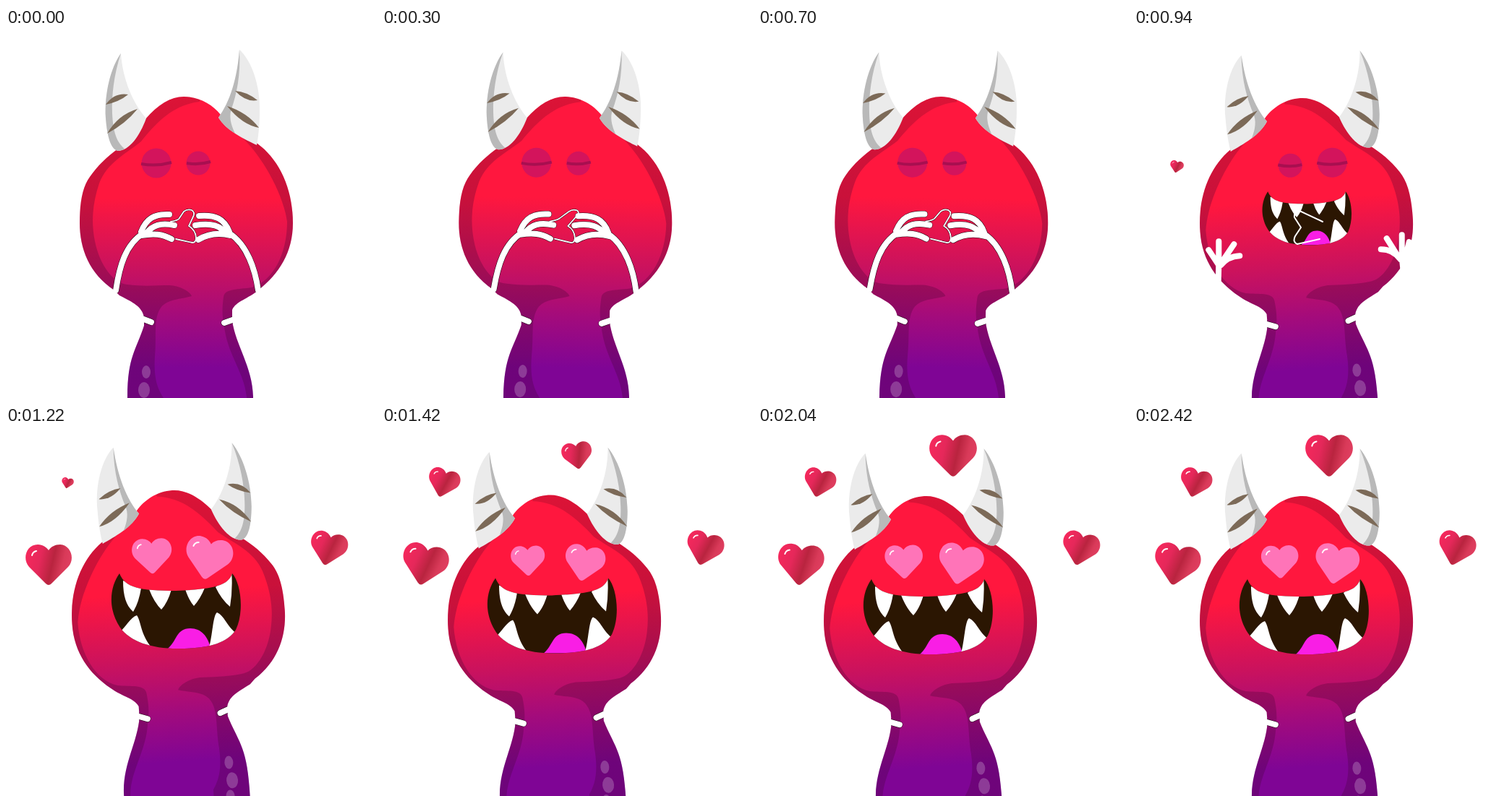
An HTML page for the animation above (2440 ms loop, 512 by 512 pixels).

```html
<!DOCTYPE html>
<html lang="en">
<head>
<meta charset="utf-8">
<title>Monster in love</title>
<style>
  html, body { margin: 0; width: 100%; height: 100%; overflow: hidden; background: #fff; }
  svg { display: block; width: 100vw; height: 100vh; }
  .line { fill: none; stroke-linecap: round; stroke-linejoin: round; }
  .white { stroke: #fff; stroke-width: 8; }
  .edge { stroke: #1c0510; stroke-width: 9; }
</style>
</head>
<body>
<svg viewBox="0 0 512 512">
  <defs>
    <linearGradient id="skin" gradientUnits="userSpaceOnUse" x1="0" y1="235" x2="0" y2="470">
      <stop offset="0" stop-color="#ff173e"/>
      <stop offset=".4" stop-color="#cb125d"/>
      <stop offset=".7" stop-color="#a30b7c"/>
      <stop offset="1" stop-color="#7f0595"/>
    </linearGradient>
    <linearGradient id="shade" gradientUnits="userSpaceOnUse" x1="0" y1="100" x2="0" y2="512">
      <stop offset="0" stop-color="#200010" stop-opacity=".16"/>
      <stop offset=".3" stop-color="#300030" stop-opacity=".26"/>
      <stop offset="1" stop-color="#380020" stop-opacity=".23"/>
    </linearGradient>
    <linearGradient id="love" x1="0" y1=".35" x2="1" y2=".55">
      <stop offset="0" stop-color="#f5285c"/>
      <stop offset=".3" stop-color="#e5285a"/>
      <stop offset=".58" stop-color="#b9243f"/>
      <stop offset=".8" stop-color="#d93a59"/>
      <stop offset="1" stop-color="#e23f62"/>
    </linearGradient>
    <path id="shape" d="M168 545V512C168 455 180 446 191 412V400C188 385 176 380 157 370L150 363C115 340 102 305 102 270C102 240 106 220 116 206C127 190 140 178 155 167C170 155 180 142 193 126C210 106 228 95 246 95C266 95 285 105 297 120C315 140 330 150 348 160C378 182 397 222 397 270C397 310 378 340 350 362C335 375 318 378 313 390V405C318 440 342 470 342 512V545Z"/>
    <clipPath id="inside"><use href="#shape"/></clipPath>
    <path id="lips" d="M157 212C165 232 185 236 235 236C290 234 308 228 313 212C325 225 330 265 318 290C304 312 270 316 238 316C200 316 172 306 158 287C140 260 144 230 157 212Z"/>
    <clipPath id="mouthClip"><use href="#lips"/></clipPath>
    <g id="heart">
      <path d="M-4 26L-27 3C-37 -8 -31 -28 -15 -28C-8 -28 -3 -24 0 -20C3 -25 9 -28 16 -28C31 -27 37 -8 27 3L4 26Q0 30 -4 26Z"/>
      <path class="line" d="M-23 -13Q-22 -18 -17 -19" stroke="#fff" stroke-width="2"/>
    </g>
    <g id="arms">
      <path d="M152 363C157 330 165 300 190 284M226 258C205 257 194 264 187 282M233 273C214 269 203 273 194 284M229 292C216 285 205 284 187 287"/>
      <path d="M349 363C345 335 334 300 309 284M267 260C290 258 302 264 309 282M262 273C285 269 297 274 305 285M266 293C279 285 295 283 311 287"/>
    </g>
    <path id="slits" d="M188 402L201 407M316 403L302 408"/>
  </defs>

  <g id="monster">
    <use href="#shape" fill="url(#skin)"/>
    <g clip-path="url(#inside)">
      <g fill="url(#shade)">
        <path d="M268 102C233 106 210 128 187 157C165 175 140 186 129 215C119 245 118 270 123 295C130 330 150 354 168 355C190 358 210 356 226 356C242 357 255 365 257 371C240 376 225 375 215 386C203 402 209 425 206 455C204 485 210 500 218 512V545H80V80H268Z"/>
        <path d="M325 150C350 172 383 225 389 268C389 312 370 350 340 359C322 362 303 360 301 372C298 395 300 402 303 420C309 455 331 480 333 512V545H420V150Z"/>
      </g>
      <g fill="#fff" opacity=".22">
        <ellipse cx="194" cy="476" rx="6" ry="9"/>
        <ellipse cx="191" cy="501" rx="8" ry="11"/>
        <ellipse cx="195" cy="523" rx="6" ry="9"/>
      </g>
      <use href="#slits" class="line edge"/>
      <g id="hug">
        <use href="#arms" class="line edge"/>
        <path id="gapEdge" class="line" stroke="#1c0510" stroke-width="2.6"/>
        <path id="gap" class="line" stroke="#fff" stroke-width="1.8"/>
      </g>
    </g>
    <use href="#slits" class="line white"/>
    <use id="hugWhite" href="#arms" class="line white"/>
    <g fill="#ebebeb">
      <path d="M159 35C161 70 176 105 194 125C185 150 170 170 155 170C145 168 140 150 138 125C136 90 145 55 159 35Z"/>
      <path d="M323 30C340 45 352 80 351 115C351 135 349 152 347 162C330 154 305 142 294 124C310 102 320 70 323 30Z"/>
    </g>
    <g fill="#b9b9b9">
      <path d="M159 35C149 65 146 95 147 118C148 143 153 158 164 167Q160 170 155 170C145 168 140 150 138 125C136 90 145 55 159 35Z"/>
      <path d="M323 30C325 65 319 92 312 112Q307 126 317 146Q302 137 294 124C310 102 320 70 323 30Z"/>
    </g>
    <g fill="#7c6a58">
      <path d="M138 106Q150 89 169 92Q157 102 138 106Z"/>
      <path d="M140 146Q155 120 182 112Q166 132 140 146Z"/>
      <path d="M317 87Q333 88 348 100Q332 103 317 87Z"/>
      <path d="M306 108Q334 117 350 138Q327 134 306 108Z"/>
    </g>
    <g id="lids">
      <g fill="#d3145c"><circle cx="208" cy="187" r="20.5"/><circle cx="266" cy="187" r="16.5"/></g>
      <path fill="none" stroke="#a80f50" stroke-width="4" d="M187 188Q208 192 229 186M250 187Q266 190 283 185"/>
    </g>
  </g>

  <g id="face">
    <g id="mouth">
      <use href="#lips" fill="#2b1602"/>
      <g clip-path="url(#mouthClip)">
        <path fill="#f91ee5" d="M221 318C237 308 234 288 255 288C271 288 280 300 284 318Z"/>
        <path fill="#fff" d="M162 222C162 245 167 257 176 265Q184 252 187 232ZM198 234Q205 252 215 262Q224 252 229 234ZM248 234Q253 249 260 257Q269 247 275 232ZM290 231Q298 248 310 258Q314 235 312 208ZM154 297C166 286 172 273 181 270C187 277 186 300 205 318H160ZM280 318C286 300 286 270 292 266C302 270 306 286 320 296L300 320Z"/>
      </g>
    </g>
    <path id="trace" class="line" stroke="#fff" stroke-width="2" d="M257 292L226 299Q219 296 223 288L231 276L222 262Q221 253 229 253L261 268"/>
    <g id="handL" class="line white"><path d="M117 365L118 328L104 307M118 325V295M120 327L139 299M121 328Q130 316 147 315"/></g>
    <g id="handR" class="line white"><path d="M374 355L370 318V286M380 296L374 320M349 291L366 318M341 306Q358 306 368 320"/></g>
    <g id="eyes" fill="#ff74b8"><use href="#heart"/><use href="#heart"/></g>
  </g>
  <g id="hearts" fill="url(#love)"></g>
</svg>
<script>
const LOOP = 2440, TURN = 860;
const el = id => document.getElementById(id);
const set = (node, name, value) => node.setAttribute(name, value);
const show = (node, on) => set(node, "display", on ? "inline" : "none");
const ease = (t, from, to) => {
  const p = Math.min(1, Math.max(0, (t - from) / (to - from)));
  return p * p * (3 - 2 * p);
};
// Swings 0 - 1 - 0 once per period.
const swing = (t, period) => (1 - Math.cos(2 * Math.PI * t / period)) / 2;
const place = (x, y, turn, size) => `translate(${x} ${y}) rotate(${turn}) scale(${size})`;

const hearts = [
  { x: 59, y: 192, size: 1, tilt: 0, sway: 13, start: 880, period: 460 },
  { x: 446, y: 170, size: .81, tilt: 13, sway: 3, start: 1040, period: 460 },
  { x: 85, y: 79, size: .69, tilt: 13, sway: 3, start: 1150, period: 460 },
  { x: 270, y: 41, size: 1.03, tilt: 0, sway: -12, start: 1320, period: 370 }
];
for (const h of hearts) {
  h.node = document.createElementNS("http://www.w3.org/2000/svg", "use");
  set(h.node, "href", "#heart");
  el("hearts").append(h.node);
}

function gapPath(k) {
  const x = v => v + 8 * k;
  return `M228 268Q239 266 ${240 + 2 * k} 263L${x(246)} 254Q${x(251)} 250 ${x(257)} 252` +
    `Q${x(262)} 255 ${259 + 5 * k} 261L253 274Q262 279 263 290Q263 297 258 297L235 292`;
}

function draw(t) {
  const turned = t >= TURN;
  const bob = -8 * ease(t, 940, 1100) * (1 - ease(t, 1270, 1480));
  set(el("monster"), "transform", turned
    ? `translate(505 ${1.5 + bob}) scale(-1 1) rotate(4 252 512)`
    : `rotate(${1.55 * swing(t, 1000)} 252 512)`);
  show(el("hug"), !turned);
  show(el("hugWhite"), !turned);
  show(el("face"), turned);
  show(el("hearts"), turned);
  const smitten = t >= 1000;
  show(el("lids"), !smitten);

  if (!turned) {
    const d = gapPath(swing(t, 600));
    set(el("gap"), "d", d);
    set(el("gapEdge"), "d", d);
    return;
  }

  set(el("face"), "transform", `translate(0 ${bob})`);
  const open = ease(t, TURN, 1040), grow = .46 + .54 * open;
  set(el("mouth"), "transform",
    `translate(${242 - 7 * open} ${263 + open}) scale(${grow} ${grow + .04 * (1 - open)}) translate(-235 -264)`);
  show(el("trace"), t < 980);

  const out = (t - 940) * .7;
  for (const [id, dir] of [["handL", -1], ["handR", 1]]) {
    show(el(id), t < 1060);
    set(el(id), "transform", `translate(${dir * out} ${out * .2})`);
  }

  show(el("eyes"), smitten);
  const beat = (.99 + .08 * Math.cos(2 * Math.PI * (t - 1240) / 365)) * (.4 + .6 * ease(t, 980, 1100));
  const [left, right] = el("eyes").children;
  set(left, "transform", place(202, 188, -2, .81 * beat));
  set(right, "transform", place(280, 191.5, 11, .96 * beat));

  for (const h of hearts) {
    const size = h.size * ease(t, h.start, h.start + 170);
    const lean = h.tilt + h.sway * swing(t - (h.period === 460 ? 1220 : 1680), h.period);
    show(h.node, size > 0);
    set(h.node, "transform", place(h.x, h.y, lean, size));
  }
}

const begin = performance.now();
function tick() {
  draw((performance.now() - begin) % LOOP);
  requestAnimationFrame(tick);
}
draw(0);
requestAnimationFrame(tick);
</script>
</body>
</html>
```
